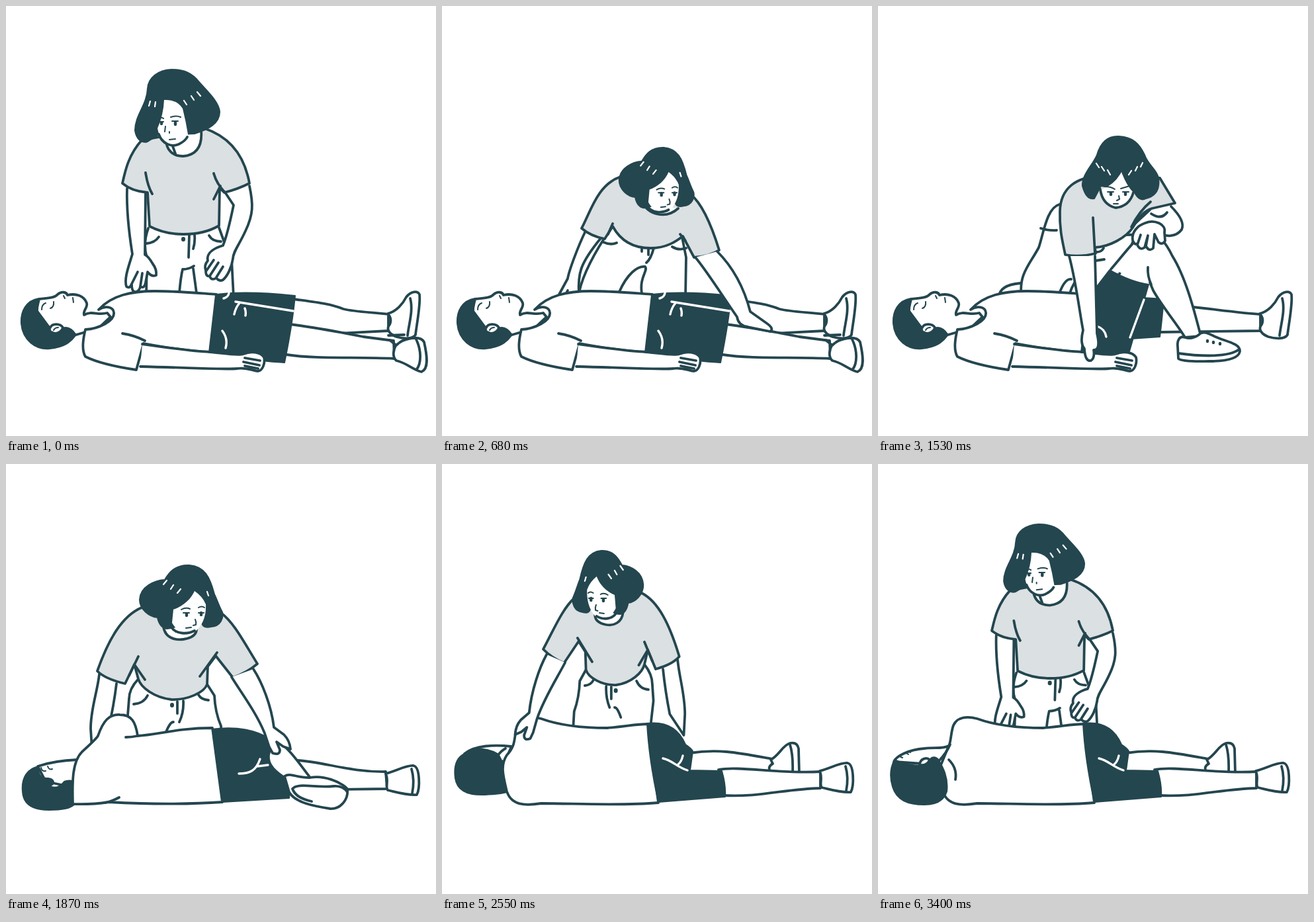
Animation of 650x650 px, one loop 4.76 s. Source, as an HTML page without scripts:

```html
<!DOCTYPE html>
<html lang="en">
<head>
<meta charset="utf-8">
<title>Recovery position</title>
<style>
html,body{margin:0;width:100%;height:100%;overflow:hidden;background:#fff}
svg{display:block;width:100%;height:100%}
path{fill:none;stroke:#24464f;stroke-width:3.8;stroke-linecap:round;stroke-linejoin:round;vector-effect:non-scaling-stroke}
.w{fill:#fff}
.g{fill:#dbe0e2}
.d{fill:#24464f;stroke-width:2}
.skin{fill:#fff;stroke:none}
.thin{stroke-width:2}
.dot{stroke-width:6}
.eye{stroke-width:4.4}
.lit{stroke:#fff;stroke-width:2.2}
.seam{stroke:#fff;stroke-width:3.4}
/* one slot = 170 ms, 28 slots per loop */
.pose{visibility:hidden;animation:one 4.76s step-end calc(var(--at)*170ms) infinite}
.two{animation-name:two}
.three{animation-name:three}
.eight{animation-name:eight}
@keyframes one{0%{visibility:visible}3.5715%,100%{visibility:hidden}}
@keyframes two{0%{visibility:visible}7.1429%,100%{visibility:hidden}}
@keyframes three{0%{visibility:visible}10.7143%,100%{visibility:hidden}}
@keyframes eight{0%{visibility:visible}28.5715%,100%{visibility:hidden}}
</style>
</head>
<body>
<svg viewBox="0 0 650 650">
<defs>
<!-- helper: upright -->
<g id="upright">
  <path class="w" d="M215 336C210 350 208 365 213 380L212 440H344L341 382 331 360 322 335"/>
  <path d="M262 434Q264 410 267 398 276 398 284 393M283 397L288 434M277 346L276 380M285 346Q286 358 283 367M212 359Q225 358 231 349M307 347Q312 356 325 356"/>
  <path class="dot" d="M268 352v1"/>
  <path class="w" d="M183 276C182 310 187 350 191 375 186 392 178 412 182 424Q187 428 190 420 190 434 197 432 202 430 203 424 209 428 211 418L214 402Q220 410 227 407 228 398 222 390 215 378 210 376L211 280M199 402L190 420M206 404L203 424"/>
  <path class="w" d="M368 272C374 300 374 315 362 340 352 362 343 372 343 382 341 395 335 408 328 414Q322 417 318 411 310 416 308 408 302 410 302 400 299 392 305 385C302 372 318 365 328 362 335 345 340 320 344 301L330 280M318 410L328 394M308 408L321 388M303 400L314 384"/>
  <path class="g" d="M205 203C185 225 180 250 176 268Q190 280 214 282L217 333Q240 345 268 345 300 345 322 332L323 275 330 282Q350 277 368 268C362 235 345 200 300 185Z"/>
  <path d="M211 252Q214 272 221 284M314 253Q318 268 331 282M324 272L314 292"/>
  <path class="w" d="M242 206C245 222 255 227 268 227 288 225 297 212 295 188"/>
  <path d="M252 212L256 223"/>
  <path class="d" d="M250 96C230 97 215 108 214 125 213 150 195 165 195 188 197 202 206 208 214 205L230 195 285 193C305 187 323 178 323 160 322 145 305 130 292 115 282 102 270 96 250 96Z"/>
  <path class="skin" d="M239 142Q258 141 267 155 272 175 275 194C273 206 262 213 250 211 238 208 232 200 229 185Q238 165 239 142Z"/>
  <path d="M231 194C236 208 250 214 261 209Q271 204 274 198"/>
  <path class="thin" d="M230 171Q235 167 238 170M249 168Q258 165 264 168M232 175h6M251 174h9M241 182L240 190M247 190v2M247 202l9-1"/>
  <path class="eye" d="M235 176v2M256 176v3"/>
  <path class="lit" d="M218 144l-2 7M226 145l-1 7M269 143l4 6M280 136l4 6M289 130l5 6"/>
</g>

<!-- helper: leaning over -->
<g id="lean-head">
  <path class="d" d="M277 153C255 152 246 165 240 175 225 176 203 185 202 205 202 220 217 231 229 232Q232 247 243 249 251 249 258 245L296 240Q298 249 310 246C325 245 329 232 327 224 322 215 319 205 315 197 308 170 300 155 277 153Z"/>
  <path class="skin" d="M253 220C270 214 280 203 285 192Q297 200 302 212C303 230 297 245 285 254 270 260 256 250 251 240Z"/>
  <path d="M250 247C257 257 274 258 285 252"/>
  <path class="thin" d="M265 220Q272 216 278 219M291 217Q296 214 300 217M268 225h9M291 225h8M286 235q2 4 1 8l-4 1M272 248l8-1"/>
  <path class="eye" d="M273 226v3M295 225v3"/>
  <path class="lit" d="M238 182l5-6M249 189l4-6M259 195l5-6M304 193l2 6"/>
</g>
<g id="lean">
  <path class="w" d="M200 325Q186 340 186 355L184 380 192 440H328L325 396Q316 375 315 350L304 333"/>
  <path d="M193 363Q208 362 214 350M291 349Q295 356 306 357M259 359v18M268 358Q269 375 262 390M242 405Q248 390 253 390"/>
  <path class="dot" d="M251 364v1"/>
  <path class="w" d="M141 318C138 345 128 370 128 400L130 432 155 400Q163 365 167 332"/>
  <path class="g" d="M205 217C175 230 155 265 138 313Q150 325 180 332L194 303 200 325C204 338 224 353 250 356 275 357 300 345 304 333L305 306 317 290 343 323Q365 315 380 302C360 270 345 240 325 225Z"/>
  <path d="M200 291L186 320M194 303L210 326M319 285L293 321"/>
  <path class="w" d="M238 246C240 262 255 267 268 265 280 263 288 258 288 250"/>
  <use href="#lean-head"/>
</g>
<path id="lean-arm" class="w" d="M341 322C355 345 378 375 391 407L398 428 403 437Q414 441 414 432L409 420 419 427 430 431Q429 418 420 409L405 398C401 365 387 330 374 310"/>

<!-- helper: reaching low -->
<g id="low">
  <path class="w" d="M246 350C230 375 210 410 206 440H368L369 380 362 345"/>
  <path d="M244 357Q255 362 264 358M348 364Q358 370 369 366M268 432C280 405 295 393 307 394 312 400 298 410 302 434M312 368v8M320 366Q316 382 309 388M302 367v4"/>
  <path class="w" d="M217 340C205 365 192 400 190 412L177 436 207 436C205 405 208 390 240 351M187 436l3-6"/>
  <path class="g" d="M270 258C235 270 225 310 211 336Q225 348 246 352L258 333C270 355 290 366 315 366 340 366 355 355 364 348L381 380Q405 378 419 369C410 340 395 300 376 285Z"/>
  <path d="M258 329L251 345M360 345l8 10"/>
  <path class="w" d="M303 296C310 315 338 323 357 306"/>
  <use href="#lean-head" transform="matrix(.9 0 0 .95 86 68.6)"/>
</g>
<path id="low-arm" class="w" d="M383 380C400 400 425 440 446 470Q448 483 462 485L496 492Q503 488 490 479L466 462C455 420 435 390 416 371"/>

<!-- helper: raising the knee -->
<g id="raise">
  <path class="w" d="M183 440Q183 422 215 419M274 300C255 305 250 345 243 365 230 390 212 405 217 440H310L365 405 390 345"/>
  <path d="M246 336Q258 340 270 339M275 432Q283 412 292 413M290 434Q294 420 310 400M329 385L342 383M330 372Q338 372 341 366"/>
  <path class="w" d="M443 303Q465 325 459 338C450 350 435 348 428 345L370 346 411 308"/>
  <path d="M413 314Q428 324 437 312"/>
  <path class="g" d="M335 258C300 258 276 275 275 310 274 340 280 360 283 376Q305 380 329 374L328 365C350 364 375 350 385 335 395 318 402 310 414 306L449 298 426 260Z"/>
  <path d="M325 320L328 375M412 296Q395 310 383 334"/>
  <path class="d" d="M364 197C345 196 336 208 331 225 325 240 308 255 309 272Q315 294 327 291L337 272 387 280Q395 297 405 291C422 287 426 275 424 260 422 248 408 240 403 225 395 208 385 198 364 197Z"/>
  <path class="w" d="M336 277Q339 300 359 305 380 303 386 282"/>
  <path class="skin" d="M337 278Q358 270 368 251 375 270 385 281Z"/>
  <path class="thin" d="M344 273Q352 273 358 277M367 276Q374 274 380 272M347 281h9M370 281h9M364 287l1 5-4 2M356 299h7"/>
  <path class="eye" d="M352 282v3M374 282v3"/>
  <path class="lit" d="M330 238l4 6M338 243l4 6M347 248l4 7M383 249l-4 6M392 243l-3 6M400 237l-3 6"/>
</g>
<g id="raise-arms">
  <path class="w" d="M289 378C300 420 305 465 310 490Q305 510 312 518 313 538 322 536 328 532 326 520 337 520 331 495L328 378"/>
  <path class="w" d="M404 328C392 332 383 342 385 354Q388 363 393 358L397 346 392 361Q396 370 403 365L408 347 405 363Q410 372 416 366L418 345 424 357Q430 362 434 355L433 342C436 330 418 322 404 328Z"/>
</g>

<!-- helper: bending sideways -->
<g id="side-pants">
  <path class="w" d="M209 312C195 345 192 370 174 394L190 405H328L322 365"/>
  <path d="M205 347Q220 350 231 343M271 366Q268 378 262 386M279 366Q277 382 266 391M240 402Q255 400 276 389"/>
  <path class="dot" d="M261 367v1"/>
</g>
<g id="side-shirt">
  <path class="g" d="M335 226C300 225 225 280 211 308 225 345 250 365 283 364L314 362 348 346 358 325 360 341Q385 340 404 334C401 310 404 285 397 268L345 230Z"/>
  <path d="M280 305C295 325 308 345 318 369M321 273C338 300 342 330 349 346M358 326Q370 315 378 304"/>
  <path class="w" d="M341 236C335 258 345 281 363 281 375 280 380 272 379 264L362 240"/>
  <path d="M352 279Q365 272 382 263"/>
</g>
<g id="side-head">
  <path class="d" d="M399 165C380 165 370 178 365 186 345 187 328 200 330 215 331 235 345 246 358 246Q360 258 372 256 380 253 384 245L404 267Q425 273 437 270 440 255 435 245C440 220 441 200 435 190 428 172 415 165 399 165Z"/>
  <path class="skin" d="M383 228C400 225 408 212 410 203Q423 212 424 228 422 240 418 250C412 262 403 267 393 264Q378 260 383 228Z"/>
  <path d="M382 258Q394 268 405 264"/>
  <path class="thin" d="M396 227Q404 223 410 226M418 226l5 1M396 232h9M416 232h6M412 242l1 5-5 2M395 258l8-1"/>
  <path class="eye" d="M402 233v3M420 233v2"/>
  <path class="lit" d="M365 192l6-4M376 200l5-5M388 207l5-6M431 216l1 7"/>
</g>
<g id="side"><use href="#side-pants"/><use href="#side-shirt"/><use href="#side-head"/></g>
<g id="side-arms">
  <path class="w" d="M362 341Q366 353 380 358L428 404 458 405C430 385 410 360 398 338"/>
  <path class="w" d="M320 364C340 390 380 405 411 414L412 426 429 442Q438 452 442 446 452 449 450 444 462 446 460 438 468 432 461 428 470 424 466 415L448 404 422 403C400 385 370 365 348 348"/>
  <path d="M432 425L442 446M438 420L451 444M445 415L460 438M450 411L464 428"/>
</g>
<g id="side-left">
  <path class="w" d="M276 299C294 318 296 355 305 392L290 405H165L158 388 170 360"/>
  <path d="M253 336Q262 345 278 343M214 358Q216 372 227 383M222 358Q223 368 229 376M206 385C220 386 235 390 240 400M215 391Q224 389 232 393M170 368Q180 368 182 360"/>
  <path class="dot" d="M205 364v1"/>
  <use href="#side-shirt" transform="rotate(-3.5 190 320) matrix(-1 0 0 1 490 -5)"/>
  <use href="#side-head" transform="matrix(-1 0 0 1 475 1)"/>
</g>
<g id="head-arms">
  <path class="w" d="M90 338C85 370 65 400 52 430L80 425C95 395 125 370 128 342"/>
  <path class="w" d="M145 345C130 375 100 395 82 422Q60 430 48 440 50 446 60 442L48 456Q52 460 60 454L56 466Q62 466 68 456L70 468Q76 466 76 456 90 445 94 430C130 410 160 385 178 358"/>
</g>

<!-- patient on the back -->
<g id="back-head">
  <path class="w" d="M50 443C65 441 74 441 78 436 84 431 91 432 93 437 106 434 118 438 122 449 124 456 116 460 118 467 130 460 138 468 153 464L158 470 140 487 106 497 66 487 46 460Z"/>
  <path class="d" d="M50 442C30 445 22 462 23 480 25 505 45 520 66 518 88 516 98 508 106 497Q96 483 86 487L66 485Q46 472 48 458 48 450 50 442Z"/>
  <path class="w" d="M67 486C70 479 82 480 86 486 84 494 74 497 69 493"/>
  <path class="thin" d="M72 490q2-4 7-4M54 459Q54 451 60 449M67 457Q73 455 72 447M87 438l2 4M101 441l1 7"/>
</g>
<g id="back-torso">
  <path class="w" d="M140 459C160 437 190 431 225 431 260 431 290 434 318 436L308 523C280 522 240 516 208 510L197 550C170 546 140 540 120 530 114 520 116 505 120 489 140 488 165 476 163 463 162 455 150 452 140 459Z"/>
  <path d="M176 495Q195 498 210 506"/>
  <path class="w" d="M206 511C240 516 280 522 308 523 330 525 350 529 359 526 370 521 385 523 390 531 392 540 388 552 380 552 370 550 362 546 350 548 330 550 290 547 203 545M361 532l23 4M359 538l24 5M361 544l20 4"/>
</g>
<g id="on-back"><use href="#back-head"/><use href="#back-torso"/></g>
<g id="far-foot">
  <path class="w" d="M577 465C590 462 600 450 605 440 612 431 622 430 625 436 627 450 621 480 619 497 615 504 600 503 590 500 582 497 574 490 579 483 583 477 582 470 577 465Z"/>
  <path d="M611 442C616 460 609 480 607 498"/>
</g>
<g id="straight-legs">
  <path class="w" d="M434 443C470 448 490 450 510 458 530 463 560 463 578 466L578 491 500 495 430 481"/>
  <use href="#far-foot"/>
  <path class="w" d="M428 481C470 486 510 494 540 500L586 506 587 533C530 530 470 534 424 527"/>
  <path class="w" d="M580 505l10 8C600 502 626 497 632 508 637 530 639 549 628 553 615 550 605 539 590 536 583 530 586 518 590 512M578 498l24-1M620 504C628 520 628 540 621 549"/>
  <path class="d" d="M318 436C350 432 390 433 437 438 434 470 428 505 421 539 400 538 380 537 355 527L308 523C314 490 315 460 318 436Z"/>
  <path class="seam" d="M347 447L434 461M353 449Q347 456 345 466M361 457q2 5 1 11M327 491Q336 503 332 517M329 442Q336 440 337 434"/>
</g>
<g id="far-leg">
  <path class="w" d="M430 450C500 457 545 464 578 466V491L426 493"/>
  <use href="#far-foot"/>
</g>
<g id="bent-leg">
  <path class="d" d="M385 440L432 443C430 465 428 485 426 500L382 503Z"/>
  <path class="w" d="M352 398C372 375 388 352 404 343 420 340 434 355 445 378 465 410 478 460 488 499L464 501C455 485 430 455 416 430L411 418M408 395Q407 408 413 421"/>
  <path class="d" d="M350 399C368 409 390 418 409 421L380 522C360 525 340 525 308 523 312 490 325 450 330 425Z"/>
  <path class="seam" d="M402 444L381 501M331 484Q343 488 345 500"/>
  <path class="w" d="M464 501C456 498 452 505 453 515L454 533Q460 538 500 537C520 537 545 535 547 522 548 510 525 507 510 500 500 495 490 490 485 497 478 502 470 503 464 501ZM454 525C490 530 530 531 546 519"/>
  <path class="eye" d="M498 506v1M507 508v1M517 510v1"/>
</g>

<!-- patient rolling -->
<g id="heel">
  <path class="w" d="M574 468C590 464 605 455 616 456 626 458 626 490 621 500 605 501 590 496 577 493 573 488 579 478 574 468Z"/>
  <path d="M613 461Q618 478 614 498"/>
</g>
<g id="roll-head">
  <path class="w" d="M48 457C65 451 85 448 108 447V490L60 480Z"/>
  <path class="d" d="M50 457C32 460 23 475 25 495 26 515 40 523 65 523 85 523 97 521 104 514L106 480Q95 477 88 480C80 490 72 490 66 487 76 483 72 476 64 475 50 476 48 466 50 457Z"/>
  <path class="thin" d="M53 459Q54 465 60 464M63 457Q65 463 70 461"/>
</g>
<g id="roll-torso">
  <path class="w" d="M101 514C100 480 100 450 115 435 128 423 136 416 139 411 147 388 156 378 172 379 190 379 196 390 199 411 230 409 260 399 312 399L327 511C270 515 210 514 155 511Q130 515 101 514Z"/>
  <path d="M181 413Q190 413 199 411M150 512Q160 510 171 504"/>
</g>
<g id="roll-hips">
  <path class="d" d="M310 401C350 396 378 402 402 417L396 445C400 460 420 470 430 478L428 505 327 511C322 480 315 440 310 401Z"/>
  <path class="seam" d="M352 468C368 468 378 464 384 446M380 457L396 455"/>
  <path class="w" d="M410 420C425 425 445 455 462 477L435 494Q420 488 424 476C408 466 395 455 397 440Q400 424 410 420Z"/>
  <path class="w" d="M421 472C430 466 440 475 460 474 480 470 505 480 516 491 518 508 505 522 490 521 465 517 437 512 428 496Z"/>
  <path d="M433 491C440 481 470 490 495 487 505 486 512 490 516 496M433 491Q438 505 462 510"/>
</g>
<g id="on-side">
  <path class="w" d="M440 448C480 450 520 466 574 465L576 491 490 492"/>
  <use href="#heel"/><use href="#roll-hips"/><use href="#roll-torso"/>
</g>

<!-- patient rolled over -->
<g id="over-head">
  <path class="w" d="M34 438C50 425 80 424 105 427L95 450Z"/>
  <path class="d" d="M34 438C20 445 18 460 20 475 23 495 40 501 65 500 80 499 92 498 98 496L92 460Q91 445 84 438 70 430 50 430 34 438Z"/>
  <path class="w" d="M84 441Q90 433 96 430"/>
</g>
<g id="turned-head">
  <path class="w" d="M24 450C27 442 45 432 70 430 85 428 98 431 107 426L95 455Z"/>
  <path class="d" d="M25 447C18 460 18 475 22 488 28 508 45 515 70 515 88 515 100 508 104 495 107 472 96 455 92 448 88 442 82 442 79 446L62 456Q40 455 25 447Z"/>
  <path class="w" d="M63 454C64 445 74 443 78 447 76 453 70 456 65 455"/>
  <path class="thin" d="M31 441l6 3M41 436l5 3M47 434l2 2"/>
  <path d="M92 449Q104 436 109 424M107 447Q120 460 117 477"/>
</g>
<path id="over-torso" class="w" d="M98 495C92 470 88 455 98 440 113 425 108 412 114 395 120 382 135 381 150 385 180 396 215 399 250 399 275 397 295 393 312 393L327 512C270 517 200 513 150 513 125 517 105 516 98 495Z"/>
<g id="over-leg">
  <path class="w" d="M418 462C450 456 510 469 572 465V490C520 491 480 504 425 501"/>
  <use href="#heel" x="-3" y="-4"/>
</g>
<g id="lifted-calf">
  <path class="w" d="M390 428C410 422 440 409 508 405L506 422C480 428 450 453 421 461L390 456"/>
  <path class="w" d="M507 402C520 403 535 393 545 389 556 388 557 400 554 415 552 428 548 431 540 430L513 424Q506 420 511 411ZM546 391Q550 410 541 430"/>
</g>
<g id="lift-body">
  <use href="#over-leg"/><use href="#over-torso"/>
  <path class="d" d="M310 394C335 390 354 396 361 410 375 414 388 415 393 419V457L424 461C428 475 429 490 428 503L327 511C318 470 312 430 310 394Z"/>
  <path class="seam" d="M347 465C358 457 366 445 368 432M358 456L391 460"/>
</g>
<g id="rest-body">
  <path class="w" d="M374 437C420 430 450 437 500 446L498 464 420 466"/>
  <path class="w" d="M497 447C510 440 515 425 526 422Q537 420 539 430L540 468 497 466Q491 458 500 453ZM526 424Q531 440 530 466"/>
  <use href="#over-leg"/><use href="#over-torso"/>
  <path class="d" d="M310 392C345 388 360 405 368 424Q377 430 379 434L375 463 423 464C427 478 429 490 428 503L327 511C318 470 312 430 310 392Z"/>
  <path class="seam" d="M334 445C348 448 355 458 371 463M357 454Q362 450 364 441"/>
</g>
</defs>

<g class="pose" style="--at:0"><use href="#upright"/><use href="#straight-legs"/><use href="#on-back"/></g>
<g class="pose" style="--at:1"><use href="#upright" y="26"/><use href="#straight-legs"/><use href="#on-back"/></g>
<g class="pose" style="--at:2"><use href="#lean" transform="matrix(-.85 0 0 1.08 497 -45)"/><use href="#straight-legs"/><use href="#on-back"/><use href="#lean-arm" transform="matrix(-.85 0 0 1.08 497 -45)"/></g>
<g class="pose" style="--at:3"><use href="#lean" x="25" y="1"/><use href="#straight-legs"/><use href="#on-back"/><use href="#lean-arm" x="25" y="1"/></g>
<g class="pose" style="--at:4"><use href="#low"/><use href="#straight-legs"/><use href="#on-back"/><use href="#low-arm"/></g>
<g class="pose" style="--at:5"><use href="#lean" x="46" y="1"/><use href="#far-leg"/><use href="#bent-leg" transform="matrix(1.17 .09 0 .8 -56 70)"/><use href="#on-back"/><use href="#lean-arm" x="46" y="1"/></g>
<g class="pose three" style="--at:6"><use href="#lean" x="46" y="1"/><use href="#far-leg"/><use href="#bent-leg" transform="matrix(1.06 0 0 1 -20 2)"/><use href="#on-back"/><use href="#lean-arm" transform="matrix(.8 0 0 .8 118 64)"/></g>
<g class="pose" style="--at:9"><use href="#raise"/><use href="#far-leg"/><use href="#bent-leg"/><use href="#on-back"/><use href="#raise-arms"/></g>
<g class="pose" style="--at:10"><use href="#lean" y="-7"/><use href="#far-leg"/><use href="#bent-leg"/><use href="#back-head"/><use href="#roll-torso" x="14"/><use href="#lean-arm" y="-7"/></g>
<g class="pose" style="--at:11"><use href="#lean"/><use href="#roll-head"/><use href="#on-side"/><use href="#lean-arm"/></g>
<g class="pose" style="--at:12"><use href="#side" x="-50" y="-9"/><use href="#roll-head" x="-5"/><use href="#over-leg"/><use href="#over-torso"/><use href="#roll-hips"/><use href="#side-arms" x="-50" y="-9"/></g>
<g class="pose" style="--at:13"><use href="#side"/><use href="#lifted-calf"/><use href="#over-head"/><use href="#lift-body"/><use href="#side-arms"/></g>
<g class="pose" style="--at:14"><use href="#side" x="-11" y="8"/><use href="#lifted-calf" y="18"/><use href="#over-head"/><use href="#lift-body"/><use href="#side-arms" x="-11" y="8"/></g>
<g class="pose two" style="--at:15"><use href="#lean" transform="matrix(-.85 0 0 1 476 -22)"/><use href="#over-head"/><use href="#rest-body"/><use href="#lean-arm" transform="matrix(-.85 0 0 1 476 -22)"/></g>
<g class="pose" style="--at:17"><use href="#side-left"/><use href="#over-head"/><use href="#rest-body"/><use href="#head-arms"/></g>
<g class="pose" style="--at:18"><use href="#side-left" y="2"/><use href="#rest-body"/><use href="#turned-head"/><use href="#head-arms" y="2"/></g>
<g class="pose" style="--at:19"><use href="#side-left" x="-4" y="4"/><use href="#head-arms" x="-4" y="4"/><use href="#rest-body"/><use href="#turned-head"/></g>
<g class="pose eight" style="--at:20"><use href="#upright" transform="matrix(.953 0 0 .936 4.3 1.1)"/><use href="#rest-body"/><use href="#turned-head"/></g>
</svg>
</body>
</html>
```
